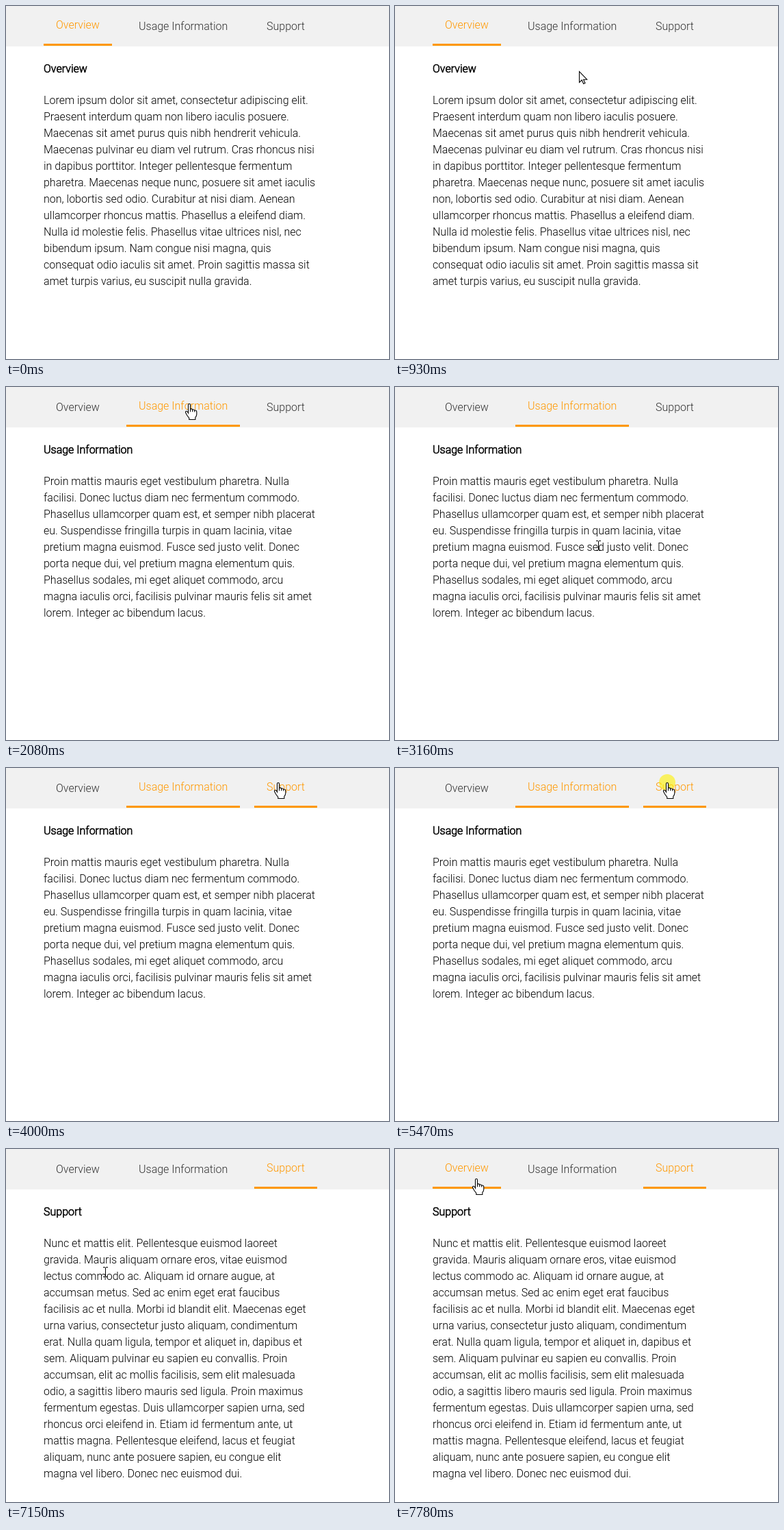
An HTML page with a canvas for the animation above (8000 ms loop, 560x515 px).

```html
<!DOCTYPE html>
<html lang="en">
<head>
<meta charset="utf-8">
<title>Tabs</title>
<style>
html, body { margin: 0; width: 100%; height: 100%; overflow: hidden; background: #fff; }
canvas { display: block; }
</style>
</head>
<body>
<canvas id="stage" width="560" height="515"></canvas>
<script>
const ctx = document.getElementById('stage').getContext('2d', { alpha: false });
const LOOP = 8000, STEP = 70, ORANGE = '#ff9800';

const tabs = [
  { label: 'Overview', x: 55, w: 100, lines: [
    'Lorem ipsum dolor sit amet, consectetur adipiscing elit.',
    'Praesent interdum quam non libero iaculis posuere.',
    'Maecenas sit amet purus quis nibh hendrerit vehicula.',
    'Maecenas pulvinar eu diam vel rutrum. Cras rhoncus nisi',
    'in dapibus porttitor. Integer pellentesque fermentum',
    'pharetra. Maecenas neque nunc, posuere sit amet iaculis',
    'non, lobortis sed odio. Curabitur at nisi diam. Aenean',
    'ullamcorper rhoncus mattis. Phasellus a eleifend diam.',
    'Nulla id molestie felis. Phasellus vitae ultrices nisl, nec',
    'bibendum ipsum. Nam congue nisi magna, quis',
    'consequat odio iaculis sit amet. Proin sagittis massa sit',
    'amet turpis varius, eu suscipit nulla gravida.'] },
  { label: 'Usage Information', x: 176, w: 166, lines: [
    'Proin mattis mauris eget vestibulum pharetra. Nulla',
    'facilisi. Donec luctus diam nec fermentum commodo.',
    'Phasellus ullamcorper quam est, et semper nibh placerat',
    'eu. Suspendisse fringilla turpis in quam lacinia, vitae',
    'pretium magna euismod. Fusce sed justo velit. Donec',
    'porta neque dui, vel pretium magna elementum quis.',
    'Phasellus sodales, mi eget aliquet commodo, arcu',
    'magna iaculis orci, facilisis pulvinar mauris felis sit amet',
    'lorem. Integer ac bibendum lacus.'] },
  { label: 'Support', x: 363, w: 92, lines: [
    'Nunc et mattis elit. Pellentesque euismod laoreet',
    'gravida. Mauris aliquam ornare eros, vitae euismod',
    'lectus commodo ac. Aliquam id ornare augue, at',
    'accumsan metus. Sed ac enim eget erat faucibus',
    'facilisis ac et nulla. Morbi id blandit elit. Maecenas eget',
    'urna varius, consectetur justo aliquam, condimentum',
    'erat. Nulla quam ligula, tempor et aliquet in, dapibus et',
    'sem. Aliquam pulvinar eu sapien eu convallis. Proin',
    'accumsan, elit ac mollis facilisis, sem elit malesuada',
    'odio, a sagittis libero mauris sed ligula. Proin maximus',
    'fermentum egestas. Duis ullamcorper sapien urna, sed',
    'rhoncus orci eleifend in. Etiam id fermentum ante, ut',
    'mattis magna. Pellentesque eleifend, lacus et feugiat',
    'aliquam, nunc ante posuere sapien, eu congue elit',
    'magna vel libero. Donec nec euismod dui.'] }
];

// start time, steps, then a quadratic curve: from, control, to
const moves = [
  [320, 3, 360, 397, 316, 290, 268, 179],
  [720, 7, 268, 176, 270, 90, 268, 24],
  [2340, 7, 267, 28, 235, 110, 294.5, 231],
  [3160, 12, 298, 231, 345, 110, 398, 22],
  [4000, 1, 398, 21, 398, 21, 398, 21],
  [6460, 12, 397, 23, 330, 264, 108.5, 164],
  [7290, 2, 106, 158, 104, 160, 101, 162],
  [7500, 5, 102, 152, 110, 85, 119, 43]
];
const clicks = [
  { from: 1880, change: 2010, to: 2080, tab: 1 },
  { from: 5470, change: 5600, to: 5600, tab: 2 }
];

const hand = new Path2D('M-1.5 14V2Q-1.5 .5 0 .5T1.5 2V8.3Q3.4 7.2 4.7 9Q6.6 8.2 7.7 10' +
  'Q10.8 9.6 10.8 12.5V16Q10.6 18.5 8.8 20.5V23.5H-.2V21.4L-3.5 17L-5.3 13.6' +
  'Q-6 11.2 -4 11.3Q-2.7 11.6 -1.5 14Z');
const knuckles = new Path2D('M1.5 8.3V12.2M4.7 9V12.2M7.7 10V12.6');
const arrow = new Path2D('M.5 .5V16.5L4.2 13L6.7 18.5L9 17.5L6.6 12.2H11.7Z');

function cursorAt(t) {
  const move = moves.filter(m => m[0] <= t).pop();
  if (!move) return null;
  const [start, n, x0, y0, cx, cy, x1, y1] = move;
  const k = Math.min(n - 1, Math.floor((t - start) / STEP));
  const p = n > 1 ? k / (n - 1) : 1;
  const u = p * p * (3 - 2 * p), v = 1 - u;
  const curve = (a, b, c) => v * v * a + 2 * u * v * b + u * u * c;
  return { x: Math.round(curve(x0, cx, x1)), y: Math.round(curve(y0, cy, y1)) };
}

function drawTab(tab, lit) {
  ctx.fillStyle = lit ? ORANGE : '#333';
  ctx.fillText(tab.label, tab.x + 18, lit ? 33 : 35);
  if (lit) ctx.fillRect(tab.x, 55, tab.w, 3);
}

function drawPanel(tab) {
  ctx.fillStyle = ctx.strokeStyle = '#000';
  ctx.lineWidth = 0.63;
  ctx.fillText(tab.label, 55, 97);
  ctx.strokeText(tab.label, 55, 97);
  tab.lines.forEach((line, i) => ctx.fillText(line, 55, 143 + i * 24));
}

function drawShape(path) {
  ctx.fillStyle = '#fff';
  ctx.strokeStyle = '#000';
  ctx.lineWidth = 1.1;
  ctx.fill(path);
  ctx.stroke(path);
}

function drawCursor({ x, y }, overTab) {
  ctx.save();
  ctx.translate(x, y);
  if (overTab) {
    drawShape(hand);
    ctx.stroke(knuckles);
  } else if (y > 126) {
    ctx.fillStyle = '#000';
    ctx.fillRect(-1, -6, 1, 13);
    for (const end of [-7, 7]) {
      ctx.fillRect(-4, end, 3, 1);
      ctx.fillRect(0, end, 3, 1);
    }
  } else {
    drawShape(arrow);
  }
  ctx.restore();
}

function draw(t) {
  const cursor = cursorAt(t);
  const current = clicks.reduce((tab, c) => t >= c.change ? c.tab : tab, 0);
  const hovered = cursor && cursor.y < 58
    ? tabs.find(tab => cursor.x >= tab.x && cursor.x < tab.x + tab.w) : null;

  ctx.fillStyle = '#fff';
  ctx.fillRect(0, 0, 560, 515);
  ctx.fillStyle = '#f1f1f1';
  ctx.fillRect(0, 0, 560, 59);
  ctx.font = '300 16px Roboto, sans-serif';
  tabs.forEach((tab, i) => drawTab(tab, i === current || tab === hovered));
  drawPanel(tabs[current]);

  if (!cursor) return;
  if (clicks.some(c => t >= c.from && t < c.to)) {
    ctx.fillStyle = 'rgba(255,242,0,.6)';
    ctx.beginPath();
    ctx.arc(cursor.x, cursor.y, 12, 0, Math.PI * 2);
    ctx.fill();
  }
  drawCursor(cursor, hovered);
}

const begin = performance.now();
function tick() {
  draw((performance.now() - begin) % LOOP);
  requestAnimationFrame(tick);
}
tick();
</script>
</body>
</html>
```
